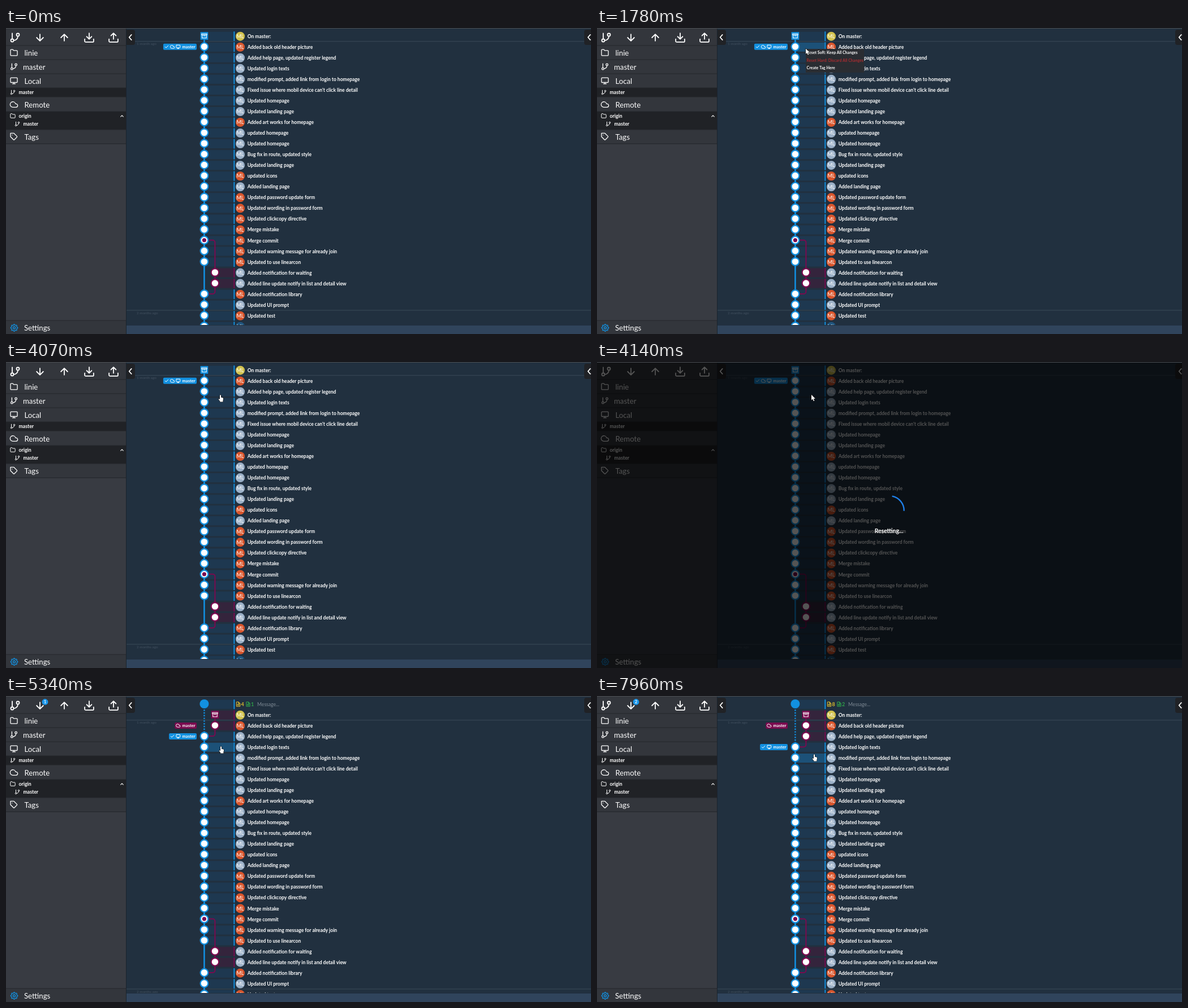
Recreate the animation shown at these times as an HTML page with a canvas. Size 1034 by 542 pixels, loop 8000 ms.

```html
<!DOCTYPE html>
<html lang="en">
<head>
<meta charset="utf-8">
<title>Commit graph reset</title>
<style>
html, body { margin: 0; width: 100%; height: 100%; overflow: hidden; background: #21303f; }
canvas { display: block; }
</style>
</head>
<body>
<canvas id="stage" width="1034" height="542"></canvas>
<script>
const ctx = document.getElementById('stage').getContext('2d');
const W = 1034, H = 542, LOOP = 8000;
const BLUE = '#1290e0', PINK = '#7b0a4f', WHITE = '#ffffff';
const AVATAR = { o: '#d9552c', b: '#9bb0c7', y: '#d2c24d' };
const COL = [350.4, 369.4];
const rowY = i => 14.7 + 19.04 * i;
const nodeY = i => rowY(i) - 0.7;

// First letter picks the avatar colour.
const COMMITS = `y On master:
o Added back old header picture
b Added help page, updated register legend
b Updated login texts
b modified prompt, added link from login to homepage
b Fixed issue where mobil device can't click line detail
b Updated homepage
b Updated landing page
o Added art works for homepage
b updated homepage
b Updated homepage
b Bug fix in route, updated style
b Updated landing page
o updated icons
b Added landing page
o Updated password update form
o Updated wording in password form
o Updated clickcopy directive
o Merge mistake
o Merge commit
o Updated warning message for already join
o Updated to use linearcon
b Added notification for waiting
b Added line update notify in list and detail view
o Added notification library
b Updated UI prompt
o Updated test`.split('\n').map(s => ({ tone: s[0], text: s.slice(2) }));
const MERGE = 19, REJOIN = 24;

const ICONS = {
  branch: 'M6 3v12M9 18a3 3 0 1 1-6 0a3 3 0 1 1 6 0M21 6a3 3 0 1 1-6 0a3 3 0 1 1 6 0M18 9a9 9 0 0 1-9 9',
  down: 'M12 5v14M19 12l-7 7-7-7',
  up: 'M12 19V5M5 12l7-7 7 7',
  pull: 'M21 15v4a2 2 0 0 1-2 2H5a2 2 0 0 1-2-2v-4M7 10l5 5 5-5M12 15V3',
  push: 'M21 15v4a2 2 0 0 1-2 2H5a2 2 0 0 1-2-2v-4M7 8l5-5 5 5M12 3v12',
  folder: 'M22 19a2 2 0 0 1-2 2H4a2 2 0 0 1-2-2V5a2 2 0 0 1 2-2h5l2 3h9a2 2 0 0 1 2 2z',
  monitor: 'M4 3h16a2 2 0 0 1 2 2v10a2 2 0 0 1-2 2H4a2 2 0 0 1-2-2V5a2 2 0 0 1 2-2zM8 21h8M12 17v4',
  cloud: 'M18 10h-1.26A8 8 0 1 0 9 20h9a5 5 0 0 0 0-10z',
  tag: 'M20.6 13.4l-7.2 7.2a2 2 0 0 1-2.8 0L2 12V2h10l8.6 8.6a2 2 0 0 1 0 2.8zM7 7h.01',
  archive: 'M21 8v13H3V8M1 3h22v5H1zM10 12h4',
  file: 'M13 2H6a2 2 0 0 0-2 2v16a2 2 0 0 0 2 2h12a2 2 0 0 0 2-2V9zM13 2v7h7M8 13h8M8 17h8',
  check: 'M20 6L9 17l-5-5',
  left: 'M15 4l-7 8 7 8',
  chevron: 'M18 15l-6-6-6 6'
};
for (const k in ICONS) ICONS[k] = new Path2D(ICONS[k]);

function icon(name, x, y, size, color = WHITE, width = 1.3) {
  const s = size / 24;
  ctx.save();
  ctx.translate(x, y);
  ctx.scale(s, s);
  ctx.translate(-12, -12);
  ctx.lineWidth = width / s;
  ctx.lineCap = ctx.lineJoin = 'round';
  ctx.strokeStyle = color;
  ctx.stroke(ICONS[name]);
  ctx.restore();
}

function text(str, x, y, size, color = WHITE, weight = 400, align = 'left') {
  ctx.font = `${weight} ${size}px Lato, sans-serif`;
  ctx.textAlign = align;
  ctx.fillStyle = color;
  ctx.fillText(str, x, y + size * 0.36);
}

function rect(x, y, w, h, color, radius = 0) {
  ctx.fillStyle = color;
  ctx.beginPath();
  ctx.roundRect(x, y, w, h, radius);
  ctx.fill();
}

function disc(x, y, r, color) {
  ctx.fillStyle = color;
  ctx.beginPath();
  ctx.arc(x, y, r, 0, 7);
  ctx.fill();
}

function line(points, color, width, dash = []) {
  ctx.strokeStyle = color;
  ctx.lineWidth = width;
  ctx.setLineDash(dash);
  ctx.beginPath();
  points.forEach(([x, y]) => ctx.lineTo(x, y));
  ctx.stroke();
  ctx.setLineDash([]);
}

function gear(x, y) {
  ctx.strokeStyle = BLUE;
  ctx.lineWidth = 1.3;
  ctx.beginPath();
  for (let i = 0; i < 32; i++) {
    const a = (i - 0.5) * Math.PI / 16, r = i % 4 < 2 ? 6.2 : 4.8;
    ctx.lineTo(x + r * Math.cos(a), y + r * Math.sin(a));
  }
  ctx.closePath();
  ctx.stroke();
  ctx.beginPath();
  ctx.arc(x, y, 2, 0, 7);
  ctx.stroke();
}

function sidebar(badge) {
  rect(0, 0, 212, H, '#383b42');
  rect(0, 0, 212, 206, '#33363c');
  rect(0, 106, 212, 16, '#202226');
  rect(0, 148, 212, 32, '#202226');
  rect(0, 518, 212, 24, '#33363c');
  for (const y of [31, 56, 81, 106, 122, 148, 180, 205, 518]) rect(0, y - 0.5, 212, 1, '#24262a');

  icon('branch', 16, 17, 20, WHITE, 1.8);
  icon('down', 60, 17, 20, WHITE, 1.8);
  icon('up', 103, 17, 20, WHITE, 1.8);
  icon('pull', 147, 17, 21, WHITE, 1.8);
  icon('push', 190, 17, 21, WHITE, 1.8);
  if (badge) {
    disc(69, 10.5, 5.4, '#1a96ea');
    text(badge, 69, 10.5, 7, WHITE, 700, 'center');
  }

  const heads = [['folder', 'linie', 44, 32.5], ['branch', 'master', 69, 30], ['monitor', 'Local', 94, 32.5],
    ['cloud', 'Remote', 136, 32.5], ['tag', 'Tags', 193, 32.5]];
  for (const [name, label, y, x] of heads) {
    icon(name, 14, y - 0.5, 14.5);
    text(label, x, y, 13.2);
  }
  icon('branch', 12, 114, 10, WHITE, 1);
  text('master', 22.5, 114, 8.7, WHITE, 700);
  icon('folder', 12, 155.5, 10, WHITE, 1);
  text('origin', 22.5, 156, 8.7, WHITE, 700);
  icon('chevron', 205, 156, 9, WHITE, 1.1);
  icon('branch', 20, 170, 10, WHITE, 1);
  text('master', 30.5, 170, 8.7, WHITE, 700);
  gear(14.5, 531);
  text('Settings', 32, 531, 13.2);
}

function label(row, icons, color) {
  const y = rowY(row) - 0.4, left = 308.5 - icons.length * 10.2;
  rect(left, y - 5.5, 337 - left, 11, color, 2);
  icons.forEach((name, i) => icon(name, left + 6 + i * 10.2, y, 8.2, WHITE, 1));
  text('master', 334.5, y, 7.5, WHITE, 700, 'right');
}

function node(x, y, color) {
  ctx.beginPath();
  ctx.arc(x, y, 6.8, 0, 7);
  ctx.fillStyle = WHITE;
  ctx.fill();
  ctx.strokeStyle = color;
  ctx.lineWidth = 2.2;
  ctx.stroke();
}

function sideLine(points) {
  ctx.strokeStyle = PINK;
  ctx.lineWidth = 2;
  ctx.beginPath();
  ctx.moveTo(...points[0]);
  for (let i = 1; i < points.length - 1; i++) ctx.arcTo(...points[i], ...points[i + 1], 4);
  ctx.lineTo(...points[points.length - 1]);
  ctx.stroke();
}

function band(row, side, hot) {
  const x = COL[side], y = rowY(row);
  rect(x, y - 8, 402 - x, 16, side ? (hot ? '#5c1a4c' : '#34243c') : (hot ? '#1c5178' : '#1e3850'));
  rect(402.3, y - 8.5, 2, 17, side ? PINK : BLUE);
}

function avatar(y, color) {
  disc(414, y, 8, color);
  text('ML', 414, y, 9, WHITE, 400, 'center');
}

function divider(y, str) {
  rect(213, y - 0.5, W - 213, 1, '#3a4a59');
  text(str, 231, y + 4.4, 6.3, '#435160');
}

// graph: commits reset in the drawn graph; reset: commits reset in labels and badge
function history(graph, reset, hover) {
  const shift = graph ? 1 : 0;
  const side = i => graph && i <= graph || i === 22 || i === 23 ? 1 : 0;
  const last = COMMITS.length + shift;

  ctx.save();
  ctx.beginPath();
  ctx.rect(213, 1, W - 213, 525);
  ctx.clip();
  divider(rowY(shift) + 9, '1 month ago');
  divider(rowY(25 + shift) + 9.3, '2 months ago');

  if (shift) band(0, 0, hover === 0);
  COMMITS.forEach((c, i) => band(i + shift, side(i), hover === i + shift));
  band(last, 0, false);

  const [a, b] = COL;
  const start = nodeY(graph ? graph + 2 : 0);
  if (graph) line([[a, 24], [a, start]], BLUE, 2.4, [2.4, 2.4]);
  line([[a, start], [a, 530]], BLUE, 2.6);
  if (graph) sideLine([[b, nodeY(1)], [b, start], [a, start]]);
  const m0 = nodeY(MERGE + shift), m1 = nodeY(REJOIN + shift);
  sideLine([[a, m0], [b, m0], [b, m1], [a, m1]]);

  if (shift) {
    disc(a, nodeY(0), 8, BLUE);
    icon('file', 410.5, 14.5, 9.5, '#d9b92f', 1.1);
    text(graph * 4, 415.5, 15, 9, '#d9b92f', 700);
    icon('file', 428, 14.5, 9.5, '#2fa04a', 1.1);
    text(graph, 433, 15, 9, '#2fa04a', 700);
    text('Message...', 444, 15, 8.6, '#7f8a95');
  }
  COMMITS.forEach((c, i) => {
    const y = rowY(i + shift), ny = nodeY(i + shift);
    const s = side(i), color = s ? PINK : BLUE;
    if (i === 0) {
      rect(COL[s] - 6.8, ny - 6.8, 13.6, 13.6, color);
      icon('archive', COL[s], ny, 10, WHITE, 1.1);
    } else {
      node(COL[s], ny, color);
      if (i === MERGE) disc(a, ny, 3.6, PINK);
    }
    avatar(y, AVATAR[c.tone]);
    text(c.text, 426.7, y, 8.5, WHITE, 700);
  });
  node(a, nodeY(last), BLUE);
  avatar(rowY(last), graph ? AVATAR.o : reset ? '#25327c' : '#1f5680');

  if (reset) {
    label(1 + shift, ['cloud'], graph ? PINK : BLUE);
    label(1 + shift + reset, ['check', 'monitor'], BLUE);
  } else {
    label(1, ['check', 'cloud', 'monitor'], BLUE);
  }
  ctx.restore();
}

function frame() {
  rect(212, 0, 1, H, '#1a232d');
  rect(213, 527, W - 213, 15, '#30445c');
  rect(213, 3, 15, 27, '#202226', [0, 4, 4, 0]);
  icon('left', 220, 16.5, 14, WHITE, 1.7);
  rect(1022, 3, 12, 27, '#202226', [4, 0, 0, 4]);
  icon('left', 1031, 16.5, 14, WHITE, 1.7);
}

function menu(x, y) {
  rect(x, y, 103, 42, '#2a2d32');
  text('Reset Soft: Keep All Changes', x + 1.5, y + 6.7, 7.05, WHITE, 700);
  text('Reset Hard: Discard All Changes', x + 1.5, y + 20.3, 7.05, '#a92c30', 700);
  text('Create Tag Here', x + 1.5, y + 33.8, 7.05, WHITE, 700);
}

function busy(t) {
  rect(0, 1, W, H - 1, 'rgba(0,0,0,.67)');
  const a = -1.38 + (t - 4140) / 1000 * Math.PI * 2;
  ctx.strokeStyle = '#1f80ea';
  ctx.lineWidth = 2.4;
  ctx.beginPath();
  ctx.arc(516.7, 263.2, 26, a, a + 1.4);
  ctx.stroke();
  text('Resetting...', 516, 299, 10.4, WHITE, 700, 'center');
}

const ARROW = new Path2D('M0 0V9.6L2.2 7.6L3.8 11.2L5.3 10.5L3.8 7.1H6.8Z');
const HAND = new Path2D('M-1 1Q0-.4 1 1V4.8L4.4 5.6Q5.2 6 5 7.4L4.4 10.4V12.4H-.8V11.2L-3.2 8.4Q-3.4 7-2.2 7.2L-1 8.2Z');
function pointer(x, y, hand) {
  ctx.save();
  ctx.translate(x, y);
  ctx.lineJoin = 'round';
  ctx.lineWidth = 1.2;
  ctx.strokeStyle = '#111';
  ctx.fillStyle = WHITE;
  const shape = hand ? HAND : ARROW;
  ctx.stroke(shape);
  ctx.fill(shape);
  ctx.restore();
}

// [first step, last step, number of steps, x, y]
const MOVES = [
  [300, 1080, 13, 387, 39], [1150, 1400, 5, 369, 36.5], [2150, 2220, 2, 367, 37],
  [2360, 2470, 3, 370.5, 51], [3030, 3210, 4, 379, 58], [4780, 5340, 9, 380, 89],
  [6330, 6780, 7, 403, 101], [7710, 7960, 5, 384, 103]
];
function pointerAt(t) {
  let x = 1062, y = 613;
  for (const [t0, t1, n, tx, ty] of MOVES) {
    if (t < t0) break;
    const step = Math.min(n, Math.floor((t - t0) / (t1 - t0) * (n - 1) + 1e-6) + 1);
    const p = step / n, e = p * (2 - p);
    x += (tx - x) * e;
    y += (ty - y) * e;
  }
  return [x, y];
}

const within = (t, a, b) => t >= a && t < b;

function draw(t) {
  const graph = t < 4410 ? 0 : t < 7280 ? 1 : 2;
  const reset = t < 4330 ? 0 : t < 7210 ? 1 : 2;
  const loading = within(t, 4140, 4330);
  const [px, py] = pointerAt(t);
  const inMenu = within(t, 3030, 4070) || within(t, 6330, 7030);
  const row = Math.round((py - 14.7) / 19.04);
  const onRow = px > 342 && px < 402 && Math.abs(py - rowY(row)) < 8.6;
  const fresh = within(t, 4070, 4330) || within(t, 4410, 4780);

  rect(0, 0, W, H, '#21303f');
  history(graph, reset, onRow && !inMenu && !fresh ? row : -1);
  sidebar(reset);
  frame();
  rect(0, 0, W, 1, '#4a4d52');

  if (within(t, 1780, 2780)) menu(369, 37);
  if (within(t, 2780, 4070)) menu(371, 51.5);
  if (within(t, 6150, 7030)) menu(380, 89.5);
  if (loading) busy(t < 4210 ? 4140 : t < 4270 ? 4210 : 4270);

  const arrow = loading || inMenu || within(t, 1780, 2150) || within(t, 2780, 3030) || within(t, 6150, 6330);
  if (t >= 300) pointer(px, py, onRow && !arrow);
}

function tick() {
  draw(performance.now() % LOOP);
  requestAnimationFrame(tick);
}
tick();
</script>
</body>
</html>
```
